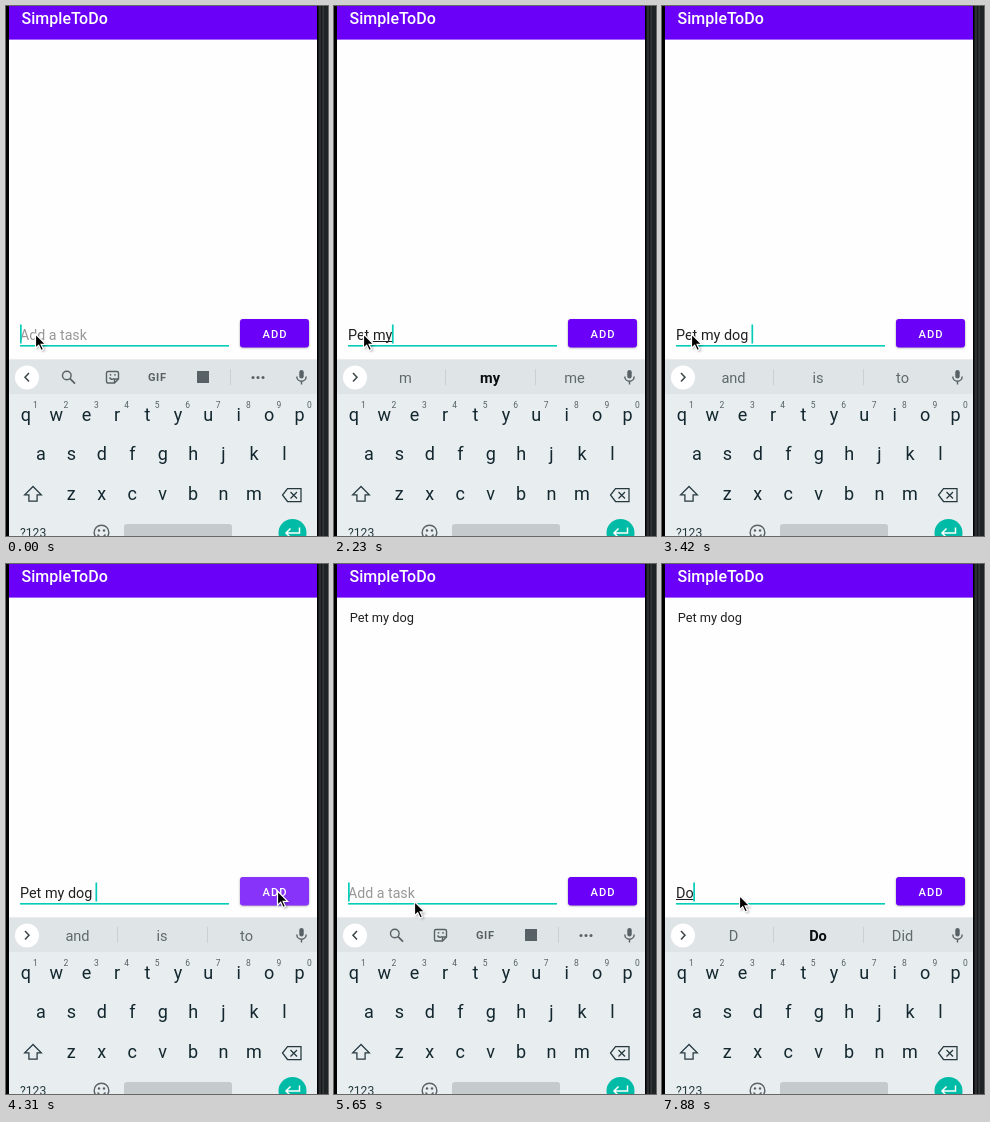
These frames come from a looping animation (322x530 px, 8 s). An HTML page:

```html
<!DOCTYPE html>
<html lang="en">
<head>
<meta charset="utf-8">
<title>To-do list</title>
<style>
  html, body { margin: 0; width: 100%; height: 100%; overflow: hidden; background: #000; }
  svg { display: block; width: 322px; height: 530px; font-family: Roboto, sans-serif; }
  .mid { text-anchor: middle; }
  .key { font-size: 18px; fill: #12272e; }
  .num { font-size: 8.5px; fill: #566166; }
  .hint { font-size: 14.2px; fill: #979797; }
  .field { font-size: 14.4px; fill: #202020; white-space: pre; }
  .word { font-size: 14.6px; fill: #606a6e; }
  .bold { font-weight: 700; fill: #0a0d0f; }
  .line { fill: none; stroke: #586165; stroke-width: 1.4; }
  .thin { fill: none; stroke: #24383e; stroke-width: 1.25; }
  .fill { fill: #586165; }
</style>
</head>
<body>
<svg viewBox="0 0 322 530">
  <defs>
    <filter id="soft" x="-20%" y="-20%" width="150%" height="150%">
      <feGaussianBlur stdDeviation="1"/>
    </filter>
  </defs>
  <rect x="312.5" width="3" height="530" fill="#2a2f31"/>
  <rect x="316.5" width="1.2" height="530" fill="#565b5d"/>
  <rect x="317.7" width="4.3" height="530" fill="#1e2324"/>
  <rect x="3" width="308" height="530" fill="#fefefe"/>
  <rect x="3" width="308" height="33.6" fill="#6a00f8"/>
  <text x="15.6" y="18" font-size="16" font-weight="500" fill="#fff">SimpleToDo</text>
  <text id="item" x="15.7" y="57.5" font-size="12.8" fill="#202020">Pet my dog</text>

  <text id="hint" class="hint" x="14" y="333.5">Add a task</text>
  <text id="field" class="field" x="14" y="333.5"></text>
  <rect id="under" y="335" height="1" fill="#202020"/>
  <rect x="14" y="339" width="209" height="1.6" fill="#03cdb8"/>
  <rect id="caret" y="318.5" width="1.7" height="19" fill="#03cdb8"/>

  <rect x="234" y="314" width="69" height="28" rx="3" opacity=".35" filter="url(#soft)"/>
  <rect x="234" y="313" width="69" height="28.5" rx="3" fill="#6a00f8"/>
  <rect id="press" x="234" y="313" width="69" height="28.5" rx="3" fill="#fff" opacity=".2"/>
  <text class="mid" x="269" y="331.7" font-size="11.2" font-weight="500" letter-spacing="1" fill="#fff">ADD</text>

  <rect x="3" y="353.5" width="308" height="177" fill="#e8edf0"/>
  <rect x="3" y="353.5" width="308" height="34.5" fill="#dfe4e6"/>
  <circle cx="21" cy="371.5" r="12" fill="#fff"/>
  <path id="chevron" d="M23 367l-4 4.3 4 4.3" fill="none" stroke="#3a4347" stroke-width="1.5"/>

  <g id="tools">
    <g class="line">
      <circle cx="60.8" cy="369.5" r="4.3"/><path d="M64 372.7l5 5" stroke-width="1.8"/>
      <path d="M102 365.5h9a1.5 1.5 0 0 1 1.5 1.5v6l-4 4h-6.5a1.5 1.5 0 0 1-1.5-1.5v-8.5a1.5 1.5 0 0 1 1.5-1.5zM112.5 373h-4v4M103.5 371.5q2 3 4.5 1"/>
      <path d="M224.5 363v16" stroke="#cbd1d3" stroke-width="1"/>
    </g>
    <g class="fill">
      <circle cx="104.5" cy="368.8" r=".9"/><circle cx="109" cy="368.8" r=".9"/>
      <text class="mid" x="151.3" y="375" font-size="11" font-weight="700" letter-spacing=".7">GIF</text>
      <rect x="191" y="365" width="12" height="12"/>
      <circle cx="247" cy="371.5" r="1.5"/><circle cx="252" cy="371.5" r="1.5"/><circle cx="257" cy="371.5" r="1.5"/>
    </g>
  </g>
  <g id="words" class="mid">
    <path d="M111.5 363v16M201.5 363v16" stroke="#cbd1d3"/>
    <text class="word" x="71.5" y="377"></text>
    <text class="word" x="156" y="377"></text>
    <text class="word" x="240.5" y="377"></text>
  </g>
  <rect class="fill" x="293.3" y="364" width="4.4" height="8.5" rx="2.2"/>
  <path class="line" d="M290.8 370.5a4.7 4.7 0 0 0 9.4 0M295.5 375v3.5"/>

  <g id="keys" class="mid"></g>
  <path class="thin" d="M27 480.5l-8.3 8.3h4.2v6.2h8.2v-6.2h4.2z"/>
  <path class="thin" d="M281.5 482.5h13.5v13h-13.5l-5-6.5zM284.5 486l6.5 6.5M291 486l-6.5 6.5"/>
  <text x="14" y="531" font-size="12.2" fill="#24383e">?123</text>
  <g class="line">
    <circle cx="95.5" cy="526.5" r="7.3"/>
    <path d="M91.5 528.5q4 5 8 0"/>
  </g>
  <circle class="fill" cx="93" cy="524.5" r="1.2"/><circle class="fill" cx="98" cy="524.5" r="1.2"/>
  <rect x="118" y="518" width="108" height="20" rx="3" fill="#c5cacc"/>
  <circle cx="286.5" cy="527" r="14" fill="#00bba6"/>
  <path d="M293.5 521.5v5.5h-13M284.5 522.5l-4.5 4.5 4.5 4.5" fill="none" stroke="#fff" stroke-width="1.5"/>

  <g id="mouse">
    <path d="M1 1v15l3.5-3 2.500 5 3-1.500-2.500-4.500h4.500z" opacity=".3" filter="url(#soft)"/>
    <path d="M0 0v14.300l3.200-3 2.400 5.200 2.400-1.100-2.400-5h4.600z" stroke="#fff" stroke-width="1.200"/>
  </g>
</svg>
<script>
const $ = id => document.getElementById(id);
const LOOP = 8000, ADDED = 4460;

// [time, text, suggestions]
const typing = [
  [0, ''],
  [1490, 'P', 'P Please Pick'], [1640, 'Pe', 'Pe Pet People'], [1790, 'Pet', 'Pets Pet Peter'],
  [1940, 'Pet ', 'the food my'], [2080, 'Pet m', 'm my me'], [2230, 'Pet my', 'm my me'],
  [2380, 'Pet my', 'may my myself'], [2670, 'Pet my ', 'way phone mom'],
  [2820, 'Pet my d', 'd dad daughter'], [2970, 'Pet my do', 'do dog door'],
  [3120, 'Pet my dog', 'do dog door'], [3270, 'Pet my dog', 'dogs dog doggy'],
  [3420, 'Pet my dog ', 'and is to'],
  [ADDED, ''], [7580, 'D'], [7730, 'D', 'D Do Did'], [7880, 'Do', 'D Do Did']
];
// [time, x, y]
const moves = [
  [0, 29.5, 328], [3720, 36, 330], [3870, 110, 338], [4020, 215, 336], [4170, 267, 329],
  [4310, 271.5, 327], [4910, 271, 329], [5060, 258, 341], [5210, 200, 354], [5360, 130, 351],
  [5500, 92, 343], [5650, 80.5, 337.5], [5800, 78, 334], [5950, 77, 332], [6400, 78, 332], [6540, 77.5, 331.5]
];
// times at which the caret toggles, starting visible
const blinks = [300, 900, 1350, 1490, 4020, 4310, 4910, 5500, 5950, 6400, 6990, 7430];

const at = (track, t) => track.findLast(step => step[0] <= t);
const show = (id, on) => $(id).style.display = on ? '' : 'none';

const pen = document.createElement('canvas').getContext('2d');
function width(text) {
  pen.font = '14.4px Roboto, sans-serif';
  return pen.measureText(text).width;
}

function keyRow(letters, x, y, digits) {
  return [...letters].map((c, i) => {
    const cx = x + i * 30.42;
    const num = digits ? `<text class="num" x="${cx + 9.7}" y="402.3">${(i + 1) % 10}</text>` : '';
    return `<text class="key" x="${cx}" y="${y}">${c}</text>${num}`;
  }).join('');
}
$('keys').innerHTML = keyRow('qwertyuiop', 19.8, 414.7, true)
  + keyRow('asdfghjkl', 35, 454) + keyRow('zxcvbnm', 65.3, 494);

const labels = $('words').querySelectorAll('text');

function draw(t) {
  const [, text, words] = at(typing, t);
  const [, x, y] = at(moves, t);
  const start = text.lastIndexOf(' ') + 1;
  const composing = start < text.length;
  const from = width(text.slice(0, start)), end = width(text);

  show('hint', !text);
  $('field').textContent = text;
  show('under', composing);
  $('under').setAttribute('x', 14 + from);
  $('under').setAttribute('width', end - from);
  show('caret', blinks.filter(b => b <= t).length % 2 === 0);
  $('caret').setAttribute('x', text ? 13.6 + end : 14);

  show('tools', !words);
  show('words', words);
  if (words) words.split(' ').forEach((w, i) => labels[i].textContent = w);
  labels[1].classList.toggle('bold', composing);
  $('chevron').setAttribute('transform', words ? 'matrix(-1 0 0 1 42 0)' : '');

  show('item', t >= ADDED);
  show('press', t >= 4310 && t < 4610);
  $('mouse').setAttribute('transform', `translate(${x} ${y})`);
}

let began;
function tick(now) {
  began ??= now;
  draw((now - began) % LOOP);
  requestAnimationFrame(tick);
}
draw(0);
requestAnimationFrame(tick);
</script>
</body>
</html>
```
